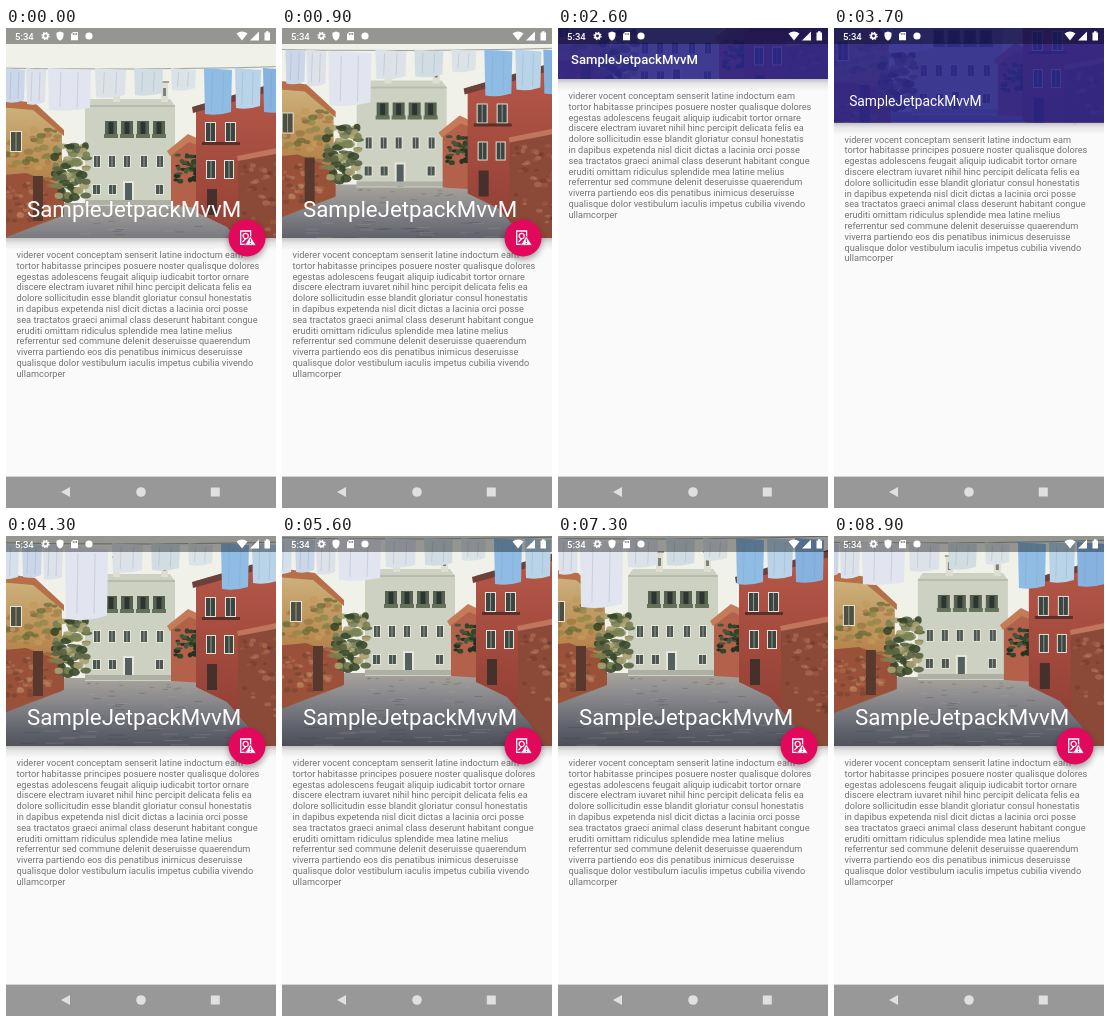
Recreate the animation shown at these times as an HTML page. Size 270 by 480 pixels, loop 9000 ms.

```html
<!DOCTYPE html>
<html lang="en">
<head>
<meta charset="utf-8">
<title>Collapsing header</title>
<style>
html, body { margin: 0; width: 100%; height: 100%; overflow: hidden; background: #fafafa; }
svg { display: block; width: 100vw; height: 100vh; }
text { font-family: Roboto, "Open Sans", sans-serif; }
</style>
</head>
<body>
<svg viewBox="0 0 270 480" xmlns="http://www.w3.org/2000/svg">
  <defs>
    <clipPath id="headerClip"><rect id="headerBox" width="270" height="210"/></clipPath>
    <linearGradient id="shade" x2="0" y2="1">
      <stop stop-opacity=".22"/><stop offset=".4" stop-opacity=".08"/><stop offset="1" stop-opacity="0"/>
    </linearGradient>
    <linearGradient id="ground" x2="0" y2="1">
      <stop stop-color="#a8a49c"/><stop offset=".3" stop-color="#85858a"/>
      <stop offset=".65" stop-color="#5d5f69"/><stop offset="1" stop-color="#40414c"/>
    </linearGradient>
    <linearGradient id="leftWall" x2="0" y2="1">
      <stop stop-color="#cfb681"/><stop offset=".45" stop-color="#b98a50"/><stop offset="1" stop-color="#874c36"/>
    </linearGradient>
    <linearGradient id="rightWall" x2="0" y2="1">
      <stop stop-color="#b8594a"/><stop offset="1" stop-color="#8b3b31"/>
    </linearGradient>
    <filter id="soft"><feGaussianBlur stdDeviation=".5"/></filter>
    <filter id="blur" x="-50%" y="-50%" width="200%" height="200%"><feGaussianBlur stdDeviation="3"/></filter>
  </defs>

  <rect width="270" height="480" fill="#fafafa"/>
  <g id="body" font-size="9.2" fill="#747474"></g>

  <rect id="headerShadow" width="270" height="12" fill="url(#shade)"/>
  <g clip-path="url(#headerClip)">
    <g id="photo" filter="url(#soft)">
      <g id="street"></g>
      <g id="laundry"></g>
    </g>
    <rect id="scrim" width="270" height="210" fill="#28238a"/>
  </g>
  <text id="title" fill="#fff">SampleJetpackMvvM</text>

  <g id="fab">
    <circle cy="3.5" r="18.5" opacity=".35" filter="url(#blur)"/>
    <circle r="18.5" fill="#e2085c"/>
    <g fill="none" stroke="#fff" stroke-width="1.3">
      <path d="M-1 6.3H-6.3V-7H3.6V-1"/>
      <circle cx="-1.3" cy="-2" r="2.6"/>
      <path d="M-4.5 4L-1.5 1"/>
    </g>
    <path d="M3.3-2L9 7.3H-2.4Z" fill="#fff" stroke="#e2085c" stroke-width=".7"/>
    <path d="M3.3 1.2V4M3.3 5V6" stroke="#e2085c"/>
  </g>

  <rect width="270" height="16" opacity=".38"/>
  <g fill="#fff">
    <text x="9" y="11.7" font-size="9.5" font-weight="500">5:34</text>
    <circle cx="39.5" cy="8" r="2.3" fill="none" stroke="#fff" stroke-width="1.8"/>
    <circle cx="39.5" cy="8" r="3.6" fill="none" stroke="#fff" stroke-width="1.2" stroke-dasharray="1.41"/>
    <path d="M54 3.4L57.500 4.800V8Q57.200 11.200 54 12.800Q50.800 11.200 50.500 8V4.800Z"/>
    <path d="M67 4H72V12.200H65V6Z"/>
    <path d="M67.300 5V7M69 5V7M70.600 5V7" stroke="#555" stroke-width=".7"/>
    <circle cx="83" cy="8" r="3.600"/>
    <path d="M230.500 5.500Q236 1.500 241.500 5.500L236 12.500Z"/>
    <path d="M253 3.500V12.500H244Z"/>
    <path d="M258.500 4.500H260V3.300H262.500V4.500H264V12.600H258.500Z"/>
  </g>

  <rect y="448.600" width="270" height="32" fill="#989898"/>
  <g fill="#e0e0e0">
    <path d="M55 464L64 459V469Z"/>
    <circle cx="135" cy="464" r="4.800"/>
    <rect x="204.800" y="459.500" width="9" height="9" rx=".6"/>
  </g>
</svg>

<script>
const NS = "http://www.w3.org/2000/svg";
const $ = id => document.getElementById(id);
const LOOP = 9000, STEP = 100, OPEN = 210, TRAVEL = 159;

function add(parent, tag, attrs) {
  const node = document.createElementNS(NS, tag);
  for (const key in attrs) node.setAttribute(key, attrs[key]);
  return parent.appendChild(node);
}
const box = (parent, x, y, width, height, fill) => add(parent, "rect", { x, y, width, height, fill });
const shape = (parent, d, fill) => add(parent, "path", { d, fill });
const set = (id, key, value) => $(id).setAttribute(key, value);

const paragraph = `viderer vocent conceptam senserit latine indoctum eam
tortor habitasse principes posuere noster qualisque dolores
egestas adolescens feugait aliquip iudicabit tortor ornare
discere electram iuvaret nihil hinc percipit delicata felis ea
dolore sollicitudin esse blandit gloriatur consul honestatis
in dapibus expetenda nisl dicit dictas a lacinia orci posse
sea tractatos graeci animal class deserunt habitant congue
eruditi omittam ridiculus splendide mea latine melius
referrentur sed commune delenit deseruisse quaerendum
viverra partiendo eos dis penatibus inimicus deseruisse
qualisque dolor vestibulum iaculis impetus cubilia vivendo
ullamcorper`;
paragraph.split("\n").forEach((line, i) => {
  add($("body"), "text", { x: 10.5, y: 230 + i * 10.8 }).textContent = line;
});

let seed = 7;
const random = (from = 0, to = 1) => {
  seed = seed * 16807 % 2147483647;
  return from + (to - from) * seed / 2147483647;
};

// Small blots of mixed tones, for leaves, bricks and paving.
function speckle(g, count, x, y, w, h, size, tones, opacity = 1) {
  for (let i = 0; i < count; i++) {
    add(g, "ellipse", {
      cx: random(x, x + w), cy: random(y, y + h), opacity,
      rx: random(size * .5, size), ry: random(size * .3, size * .7), fill: tones[i % tones.length]
    });
  }
}

function windowAt(g, x, y, w, h, glass = "#4b5650") {
  box(g, x - 1, y - 1, w + 2, h + 2, "#e6e4d8");
  box(g, x, y, w, h, glass);
  box(g, x + w / 2 - .4, y, .8, h, "#a9aea3");
}

function drawPaleHouse(g) {
  shape(g, "M83 42L88 35H168L173 42V142H83Z", "#cdd1c1");
  box(g, 83, 41, 90, 2, "#b8baad");
  for (const x of [111, 159]) {
    box(g, x, 18, 7, 20, "#dedfd2");
    box(g, x - 1, 17, 9, 2, "#a5a399");
    box(g, x + 2, 24, 3, 8, "#7b8078");
  }
  for (const x of [103, 119, 135, 151]) {
    box(g, x, 57, 12, 14, "#56624f");
    box(g, x + 3.5, 58, 5, 12, "#2d3531");
    box(g, x - 1, 70, 14, 4, "#65705b");
  }
  for (const x of [92, 107, 122, 139, 155]) windowAt(g, x, 92, 6, 11);
  for (const x of [91, 107, 154]) windowAt(g, x, 121, 7, 9);
  box(g, 121, 117, 11, 24, "#e8e7db");
  box(g, 123, 119, 7, 22, "#53605f");
  box(g, 83, 136, 90, 5, "#aeb0a6");
}

function drawRightSide(g) {
  shape(g, "M169 142V84L187 73L202 80V144Z", "#b3614b");
  shape(g, "M165 87L186 70L205 79V85L187 78L168 92Z", "#c57b57");
  speckle(g, 40, 174, 91, 22, 27, 4, ["#243321", "#33462c", "#45573a"]);
  shape(g, "M194 42L310 10V215H270L225 163L194 148Z", "url(#rightWall)");
  shape(g, "M190 43L310 8V16L191 49Z", "#6f4039");
  for (const x of [204, 224]) windowAt(g, x, 59, 9, 18, "#3b4642");
  box(g, 200, 78, 38, 3, "#582f2b");
  for (const x of [205, 223]) windowAt(g, x, 97, 8, 17, "#3c4540");
  box(g, 205, 125, 10, 26, "#45302c");
  shape(g, "M236 94L310 80V225H270L236 171Z", "#8b4937");
  shape(g, "M235 92L310 77V83L236 97Z", "#c0765c");
  speckle(g, 65, 240, 99, 55, 82, 4, ["#a96048", "#6d362c", "#bb8066"], .45);
}

function drawLeftSide(g) {
  shape(g, "M-40 34L34 42L60 68V152L-40 190Z", "url(#leftWall)");
  shape(g, "M-40 29L33 39L62 66V72L31 46L-40 40Z", "#b66f48");
  speckle(g, 58, -20, 64, 76, 42, 5, ["#918648", "#c29a5d", "#696c37", "#ad7848"], .75);
  shape(g, "M-40 115L24 109L62 123V151L28 163L-40 191Z", "#995239");
  speckle(g, 70, -20, 115, 70, 42, 4, ["#b67250", "#683d31", "#c2926c"], .45);
  windowAt(g, 9, 68, 10, 19, "#4d4f40");
  box(g, 31, 112, 10, 45, "#59382d");
  speckle(g, 65, 52, 80, 33, 57, 6, ["#596342", "#798152", "#374729", "#a7a070"], .9);
}

function drawStreet() {
  const g = $("street");
  box(g, -60, -60, 390, 290, "#f0f1e9");
  shape(g, "M-60 139H330V225H-60Z", "url(#ground)");
  drawPaleHouse(g);
  drawRightSide(g);
  drawLeftSide(g);
  for (let i = 0; i < 90; i++) {
    const y = random(143, 212), spread = y - 90;
    add(g, "rect", {
      x: 125 + random(-spread, spread), y, width: (y - 130) / 4, height: 1,
      fill: i % 2 ? "#333641" : "#b1aaa1", opacity: .22
    });
  }
}

function cloth(g, id, x, width, bottom, fill) {
  const node = add(g, "g", { id });
  shape(node, `M${x} 4L${x + width} 6L${x + width - 1} ${bottom - 2}Q${x + width / 2} ${bottom + 2} ${x + 1} ${bottom}Z`, fill);
  for (const k of [.3, .7]) {
    add(node, "path", {
      d: `M${x + width * k} 8L${x + width * k - 1} ${bottom - 3}`, stroke: "#8294a8", "stroke-width": 1, opacity: .25
    });
  }
}

function drawLaundry() {
  const g = $("laundry");
  add(g, "path", { d: "M-60 3Q130 8 330 1", fill: "none", stroke: "#898d8b", "stroke-width": .8 });
  cloth(g, "sheet", 42, 43, 46, "#e2e4ef");
  [
    [-32, 28, 40, "#d5e0ec"], [-1, 20, 38, "#cbd7e8"], [20, 20, 40, "#dde1ea"],
    [89, 31, 33, "#dde2e9"], [128, 29, 31, "#d2dde3"], [165, 25, 26, "#dce3e6"],
    [198, 28, 50, "#8fbce4"], [229, 26, 44, "#b9d4e9"], [257, 29, 48, "#86b2df"]
  ].forEach(([x, w, bottom, fill], i) => cloth(g, "cloth" + i, x, w, bottom, fill));
}

const clamp = x => Math.max(0, Math.min(1, x));
const ease = x => { x = clamp(x); return x * x * (3 - 2 * x); };
const ramp = (t, start, span) => clamp((t - start) / span);
const mix = (a, b, k) => a + (b - a) * k;

// time, street x, camera y, laundry x, sheet stretch
const drift = [
  [0, -4, 36, 0, 0], [1700, -12, 2, 8, 25], [2600, -8, 2, 11, 28], [4300, -4, 3, 17, 34],
  [5600, 0, -2, 14, 0], [7300, -13, -2, -20, 27], [9000, 1, 2, -14, 0]
];
function driftAt(t) {
  const i = drift.findIndex((key, n) => n && t <= key[0]);
  const from = drift[i - 1], to = drift[i];
  const k = ease((t - from[0]) / (to[0] - from[0]));
  return from.map((v, n) => mix(v, to[n], k));
}

function render(t) {
  const collapsed = ease(ramp(t, 1340, 1000)) - ease(ramp(t, 3400, 870));
  const offset = collapsed * TRAVEL, height = OPEN - offset;
  set("headerBox", "height", height);
  set("headerShadow", "y", height);
  set("body", "transform", `translate(0 ${-offset})`);

  const [, streetX, cameraY, laundryX, stretch] = driftAt(t);
  set("photo", "transform", `translate(0 ${cameraY - offset / 2})`);
  set("street", "transform", `translate(${streetX} 0)`);
  set("laundry", "transform", `translate(${laundryX} 0)`);
  set("sheet", "transform", `scale(1 ${1 + stretch / 46})`);
  set("scrim", "opacity", .9 * (ramp(t, 2025, 600) - ramp(t, 3680, 600)));

  const shrink = 1 - (1 - collapsed) ** 2;
  set("title", "x", mix(21, 13, collapsed));
  set("title", "y", mix(189, 36, collapsed));
  set("title", "font-size", mix(22.3, 13.1, shrink));
  set("title", "font-weight", collapsed > .95 ? 500 : 400);

  const fab = 1 - ramp(t, 2025, 200) + ramp(t, 3680, 200);
  set("fab", "transform", `translate(241 ${height}) scale(${fab})`);
  set("fab", "opacity", fab);
}

drawStreet();
drawLaundry();
const begin = performance.now();
function tick() {
  const t = (performance.now() - begin) % LOOP;
  render(Math.floor(t / STEP) * STEP);
  requestAnimationFrame(tick);
}
tick();
</script>
</body>
</html>
```
